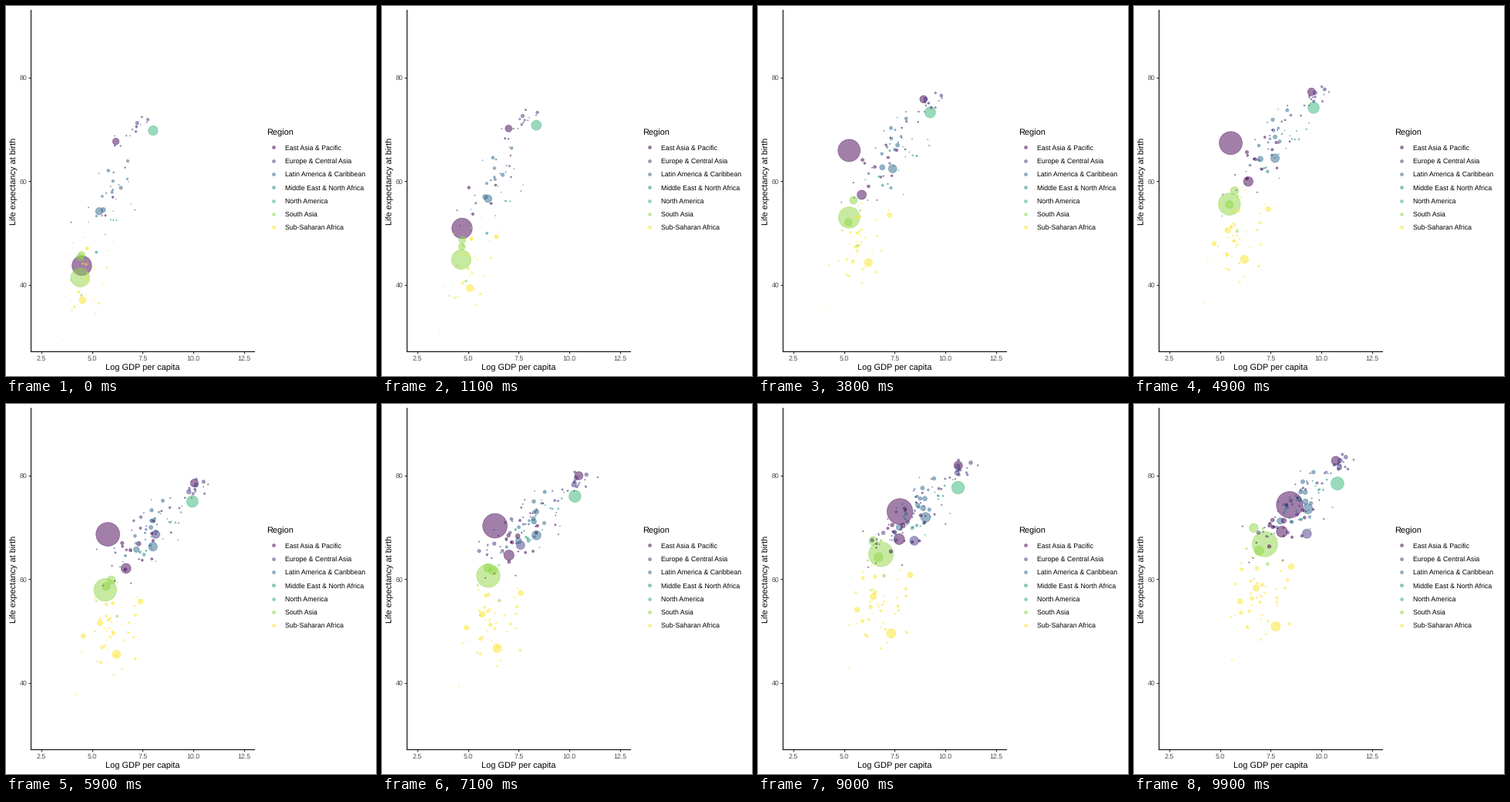
A matplotlib script that plays this animation: 480 by 480 pixels, repeating every 10 s.

```python
import numpy as np
import matplotlib.pyplot as plt
from matplotlib.animation import FuncAnimation
from matplotlib.colors import to_rgba

plt.rcParams["font.family"] = "Liberation Sans"
plt.rcParams["text.hinting"] = "none"

SIZE, DPI = 480, 80
PT = 72 / DPI                      # points per pixel
FRAMES, INTERVAL = 100, 100
FIRST, LAST = 1960, 2010
YEARS = np.arange(FIRST, LAST + 1)
STALLED = (4, 26, 32)              # frames that repeat the one before
LINE, STROKE = 1.07 * PT, 0.7      # axis width in points, dot outline in pixels

REGIONS = {
    "East Asia & Pacific": "#440154",
    "Europe & Central Asia": "#443A83",
    "Latin America & Caribbean": "#31688E",
    "Middle East & North Africa": "#21908C",
    "North America": "#35B779",
    "South Asia": "#8FD744",
    "Sub-Saharan Africa": "#FDE725",
}
COLORS = [to_rgba(c, 0.5) for c in REGIONS.values()]
EAP, ECA, LAC, MENA, NAM, SAS, SSA = range(7)

rng = np.random.default_rng(12)
bubbles = []


def yearly(stops, start):
    """Yearly path through (log GDP, life expectancy) stops evenly spaced in time."""
    when = np.linspace(start, LAST, len(stops))
    return np.column_stack([np.interp(YEARS, when, axis) for axis in zip(*stops)])


def country(region, radius, *stops, born=FIRST):
    bubbles.append((radius, region, born, yearly(stops, born)))


def cloud(region, count, *stops, spread, noise, early=0.0, start=FIRST):
    """Smaller countries scattered along a regional trend, some joining later."""
    trend = yearly(stops, start)
    for _ in range(count):
        wealth, health = np.clip(rng.normal(size=2), -2, 2) * (spread, noise)
        path = trend + (wealth, 3 * wealth + health)
        path[:, 0] += np.cumsum(rng.normal(0, 0.05, len(YEARS)))
        radius = min(0.95 + rng.exponential(0.85), 4.5)
        born = FIRST if rng.random() < early else rng.uniform(start, 1995)
        bubbles.append((radius, region, born, path))


# The largest populations
country(EAP, 17.5, (4.49, 43.7), (5.12, 65.3), (5.95, 69.6), (8.43, 74.4))
country(SAS, 16.8, (4.41, 41.4), (5.15, 51.8), (5.78, 59.6), (7.21, 66.8))
country(NAM, 8.8, (8.01, 69.8), (9.08, 72.9), (10.18, 75.6), (10.79, 78.5))
country(EAP, 7.5, (4.0, 51), (6.2, 58.5), (7.0, 64.6), (8.05, 69.2), born=1967)
country(LAC, 6.8, (5.35, 54.2), (7.25, 61.5), (8.2, 67.6), (9.33, 73.6))
country(SAS, 6.4, (4.40, 45.3), (5.35, 55.5), (6.1, 61), (6.92, 65.5))
country(SSA, 6.4, (4.53, 37), (6.2, 44), (6.2, 45.9), (7.74, 50.9))
country(ECA, 6.3, (8.3, 69.3), (7.3, 65.5), (9.28, 68.8), born=1988)
country(SAS, 6.2, (4.48, 45.8), (5.1, 50.5), (5.85, 60.8), (6.66, 69.9))
country(EAP, 6.1, (6.17, 67.7), (8.65, 75.2), (10.42, 79.5), (10.71, 82.9))

# Everyone else
cloud(EAP, 25, (5.6, 56), (6.8, 63), (7.6, 67.5), (8.3, 71),
      spread=0.9, noise=3.2, early=0.25)
cloud(ECA, 19, (6.95, 69.3), (8.7, 73.4), (10.05, 77), (10.6, 81),
      spread=0.42, noise=1, early=0.75)
cloud(ECA, 20, (7.4, 69.5), (7.0, 68.8), (8.5, 72.5),
      spread=0.75, noise=1.8, start=1987)
cloud(LAC, 27, (5.95, 58), (7.2, 65.5), (8.0, 70.3), (8.85, 74.8),
      spread=0.55, noise=2.8, early=0.65)
cloud(MENA, 15, (5.6, 50), (7.7, 61), (8.3, 70.5), (9.2, 74.8),
      spread=0.7, noise=2.6, early=0.35)
cloud(SAS, 4, (4.4, 43), (7.0, 68), spread=0.35, noise=5, early=1)
cloud(SSA, 43, (4.7, 41.5), (5.6, 47), (5.9, 50.5), (6.8, 56.5),
      spread=0.65, noise=4.3, early=0.65)

bubbles.sort(key=lambda b: -b[0])
radius, region, born, paths = (np.array(column) for column in zip(*bubbles))
rgba = np.array(COLORS)[region]


def area(r):
    """Scatter size whose outer edge, stroke included, has this pixel radius."""
    return ((2 * r - STROKE) * PT) ** 2


def state(year):
    """Positions, sizes and colours of the countries with data in this year."""
    t = year - FIRST
    i = min(int(t), len(YEARS) - 2)
    points = paths[:, i] + (paths[:, i + 1] - paths[:, i]) * (t - i)
    growth = 0.75 + 0.25 * t / (LAST - FIRST)
    shown = born <= year
    return points[shown], area(radius[shown] * growth), rgba[shown]


fig = plt.figure(figsize=(SIZE / DPI, SIZE / DPI), dpi=DPI, facecolor="white")


def label(x, y, text, px, **style):
    fig.text(x / SIZE, 1 - y / SIZE, text, fontsize=px * PT, color="black", **style)


# Panel
left, right, top, bottom = 32.4, 322, 5.5, 448.2
ax = fig.add_axes([left / SIZE, 1 - bottom / SIZE,
                   (right - left) / SIZE, (bottom - top) / SIZE])
ax.set_xlim(1.98, 13)
ax.set_ylim(27.1, 93.05)
ax.set_xticks(np.arange(2.5, 13, 2.5))
ax.set_yticks([40, 60, 80])
ax.tick_params(length=2.75 * PT, width=LINE, pad=2.2 * PT,
               labelsize=8.8 * PT, color="#333333", labelcolor="#4D4D4D")
ax.spines[["top", "right"]].set_visible(False)
ax.spines[["left", "bottom"]].set_linewidth(LINE)
label(177.5, 473, "Log GDP per capita", 11, ha="center", va="baseline")
label(16, 227, "Life expectancy at birth", 11, ha="right", va="center", rotation=90)

# Legend
page = fig.add_axes([0, 0, 1, 1])
page.set(xlim=(0, SIZE), ylim=(SIZE, 0))
page.axis("off")
label(338.3, 168, "Region", 11, va="baseline")
for row, name in enumerate(REGIONS):
    y = 183.4 + 17.28 * row
    page.scatter(347.3, y, s=area(2.3), color=[COLORS[row]], linewidths=STROKE * PT)
    label(361.5, y + 3.2, name, 8.8, va="baseline")

points, sizes, colors = state(FIRST)
dots = ax.scatter(*points.T, s=sizes, c=colors, linewidths=STROKE * PT, zorder=3)


def update(frame):
    step = frame - 1 if frame in STALLED else frame
    points, sizes, colors = state(FIRST + (LAST - FIRST) * step / (FRAMES - 1))
    dots.set_offsets(points)
    dots.set_sizes(sizes)
    dots.set_facecolor(colors)
    return (dots,)


anim = FuncAnimation(fig, update, frames=FRAMES, interval=INTERVAL,
                     repeat=True, repeat_delay=0, blit=False)
plt.show()
```
